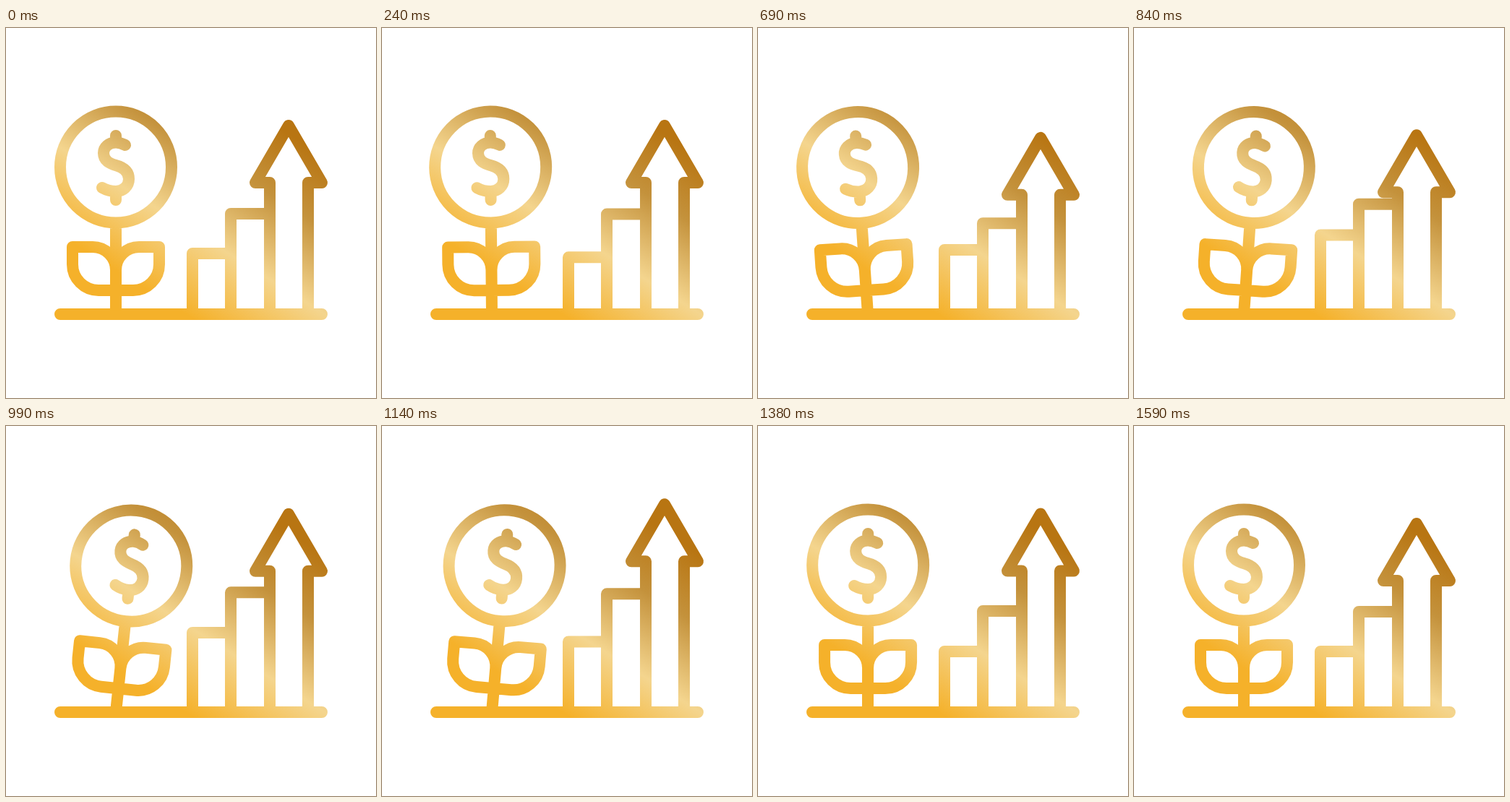
An HTML page with a canvas for the animation above (1.83 s loop, 512x512 px).

```html
<!DOCTYPE html>
<html lang="en">
<head>
<meta charset="utf-8">
<title>Growing investment</title>
<style>
  html, body { margin: 0; width: 100%; height: 100%; overflow: hidden; background: #fff; }
  canvas { display: block; width: 512px; height: 512px; }
</style>
</head>
<body>
<canvas id="stage" width="512" height="512"></canvas>
<script>
const ctx = document.getElementById('stage').getContext('2d');
const LOOP = 1830, STEP = 30, SWING = 12;

const gold = ctx.createLinearGradient(0, 250, 166.9, -14.8);
gold.addColorStop(0.03, '#f5b12a');
gold.addColorStop(0.357, '#f4d58e');
gold.addColorStop(0.676, '#c4923c');
gold.addColorStop(0.946, '#b87512');

// Ease-in-out curve, cubic-bezier(.58, 0, .42, 1) without the tiny CSS rounding
function ease(x) {
  let lo = 0, hi = 1, s = x;
  for (let i = 0; i < 24; i++) {
    s = (lo + hi) / 2;
    const bx = 1.74 * s * (1 - s) ** 2 + 1.26 * s * s * (1 - s) + s ** 3;
    if (bx < x) lo = s; else hi = s;
  }
  return s * s * (3 - 2 * s);
}

// Rest -> first -> second -> rest, each leg lasting SWING ticks
function swing(tick, start, first, second) {
  const keys = [0, first, second, 0];
  const pos = Math.min(3, Math.max(0, (tick - start) / SWING));
  const leg = Math.min(2, Math.floor(pos));
  return keys[leg] + (keys[leg + 1] - keys[leg]) * ease(pos - leg);
}

const lift = (tick, start) => swing(tick, start, 17, -27);

function line(...points) {
  ctx.moveTo(points[0], points[1]);
  for (let i = 2; i < points.length; i += 2) ctx.lineTo(points[i], points[i + 1]);
}

// side is -1 for the left leaf, 1 for the right one; the stem is x = 0
function leaf(side) {
  ctx.moveTo(0, 363);
  ctx.arcTo(0, 303, side * 32, 303, 32);
  ctx.lineTo(side * 60, 303);
  ctx.arcTo(side * 60, 363, 0, 363, 36);
  ctx.closePath();
}

function dollar() {
  line(0, 149, 0, 158);
  line(0, 226, 0, 238);
  ctx.moveTo(13, 162);
  ctx.quadraticCurveTo(6, 158.5, 0, 158.5);
  ctx.bezierCurveTo(-10, 158.5, -17, 165, -17, 173);
  ctx.bezierCurveTo(-17, 184, -8, 187.5, 0, 190);
  ctx.bezierCurveTo(11, 193, 18, 199, 18, 209);
  ctx.bezierCurveTo(18, 219, 10, 226, 0, 226);
  ctx.quadraticCurveTo(-10, 226, -19, 221);
}

function flower(angle) {
  ctx.save();
  ctx.translate(152, 396);
  ctx.rotate(angle * Math.PI / 180);
  ctx.translate(0, -396);
  ctx.moveTo(77, 192.5);
  ctx.arc(0, 192.5, 77, 0, 2 * Math.PI);
  dollar();
  line(0, 270, 0, 396);
  leaf(-1);
  leaf(1);
  ctx.restore();
}

function chart(low, mid, high) {
  line(258, 396, 258, 312 + low, 311, 312 + low);
  line(311, 396, 311, 257 + mid, 365, 257 + mid);
  const base = 214 + high;
  line(365, 396, 365, base, 345, base, 391, base - 79, 437, base, 418, base, 418, 396);
}

function draw(ms) {
  const tick = Math.floor(Math.floor(ms % LOOP / STEP) * 5 / 6);
  ctx.fillStyle = '#fff';
  ctx.fillRect(0, 0, 512, 512);
  ctx.strokeStyle = gold;
  ctx.lineWidth = 16;
  ctx.lineCap = ctx.lineJoin = 'round';
  ctx.beginPath();
  line(75, 396, 437, 396);
  flower(swing(tick, 3, -6, 6));
  chart(lift(tick, 1), lift(tick, 4), lift(tick, 8));
  // Stroked outside the rotation so the gradient stays fixed to the stage
  ctx.stroke();
}

let origin;
function loop(now) {
  origin ??= now;
  draw(now - origin);
  requestAnimationFrame(loop);
}
draw(0);
requestAnimationFrame(loop);
</script>
</body>
</html>
```
